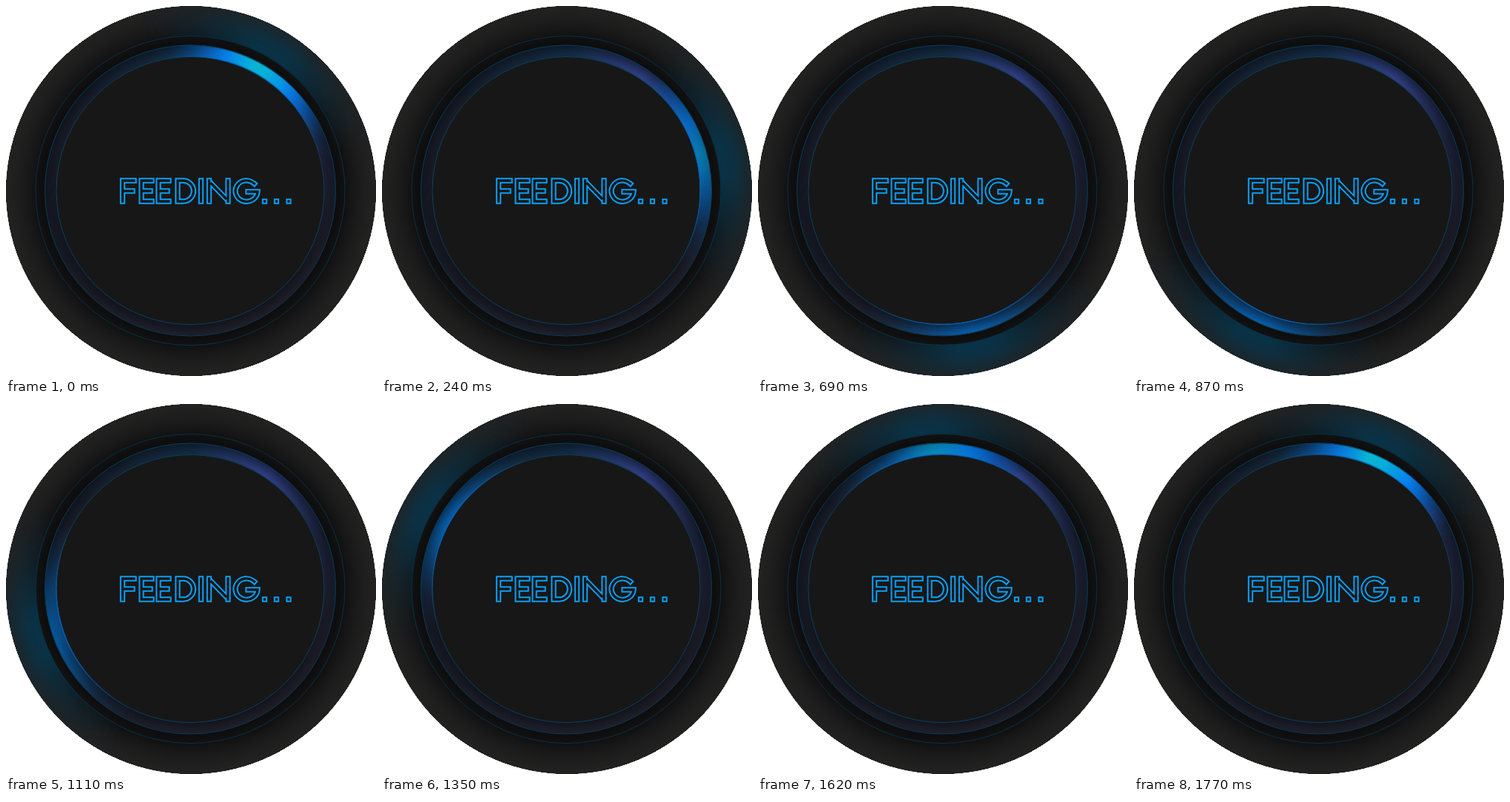
Recreate the animation shown at these times as an HTML page. Size 500x500 px, loop 1.8 s.

```html
<!DOCTYPE html>
<html lang="en">
<head>
<meta charset="utf-8">
<title>Feeding</title>
<style>
  html, body { margin: 0; width: 100%; height: 100%; overflow: hidden; background: #fff; }
  .dial { position: relative; width: 500px; height: 500px; overflow: hidden; }
  .dial div, .dial svg { position: absolute; inset: 0; }
  .dial .hub { inset: -1px 1px 1px -1px; }

  .disc {
    border-radius: 50%;
    overflow: hidden;
    background: radial-gradient(circle closest-side, #111 209px, #181818 221px, #1e1e1e 234px, #222221 250px);
  }

  .spin { animation: spin 1.8s steps(60) infinite; }
  @keyframes spin {
    from { transform: rotate(30deg); }
    to { transform: rotate(390deg); }
  }

  /* soft light on the outer plate */
  .halo {
    -webkit-mask: radial-gradient(circle closest-side, #000 212px, rgba(0,0,0,.85) 228px, rgba(0,0,0,.25) 250px);
    mask: radial-gradient(circle closest-side, #000 212px, rgba(0,0,0,.85) 228px, rgba(0,0,0,.25) 250px);
  }
  .halo .spin {
    background: conic-gradient(from -46deg, transparent, rgba(8,56,80,.3) 18deg, rgba(8,56,80,.85) 40deg,
      rgba(8,56,80,.85) 52deg, rgba(8,56,80,.3) 74deg, transparent 92deg);
  }

  .groove {
    background: radial-gradient(circle closest-side, #0d0d0e 198px, #111112 208px, transparent 209.5px);
  }

  /* the glowing channel */
  .ring {
    -webkit-mask: radial-gradient(circle closest-side, transparent 180px, #000 181px 196px, transparent 197px);
    mask: radial-gradient(circle closest-side, transparent 180px, #000 181px 196px, transparent 197px);
    background: conic-gradient(#12293f, #213463 18deg, #2f3d80 34deg, #262f5e 48deg, #1b2036 68deg,
      #1c1c27 110deg, #1e1d26 150deg, #1d1e2a 190deg, #181a24 240deg, #161b26 310deg, #12293f);
  }
  .beam {
    background: conic-gradient(from -46deg, transparent, rgba(8,86,156,.2) 14deg, rgba(8,86,156,.65) 28deg,
      rgba(8,90,164,.96) 42deg, rgba(8,90,164,.96) 50deg, rgba(8,86,156,.65) 64deg,
      rgba(8,86,156,.2) 78deg, transparent 92deg);
  }

  /* bevel: outer side dark above, inner side dark below */
  .above {
    background: radial-gradient(circle closest-side, transparent 184px, rgba(6,10,16,.5) 197px);
    -webkit-mask: linear-gradient(#000 30%, transparent 70%);
    mask: linear-gradient(#000 30%, transparent 70%);
  }
  .below {
    background: radial-gradient(circle closest-side, rgba(6,10,16,.5) 181px, transparent 194px);
    -webkit-mask: linear-gradient(transparent 40%, #000 80%);
    mask: linear-gradient(transparent 40%, #000 80%);
  }

  .boost {
    -webkit-mask: conic-gradient(from -25deg, transparent, rgba(0,0,0,.6) 25deg, #000 45deg 65deg, rgba(0,0,0,.5) 90deg, transparent 130deg);
    mask: conic-gradient(from -25deg, transparent, rgba(0,0,0,.6) 25deg, #000 45deg 65deg, rgba(0,0,0,.5) 90deg, transparent 130deg);
  }
  .boost .spin {
    background: conic-gradient(from -40deg, transparent, rgba(4,110,225,.45) 12deg, #0682f2 24deg,
      #08b4d4 37deg, #08b0d8 43deg, #0680ee 56deg, rgba(4,100,215,.5) 68deg, transparent 80deg);
  }

  .edge {
    -webkit-mask: radial-gradient(circle closest-side, transparent 180px, #000 180.6px 181.6px, transparent 182.4px);
    mask: radial-gradient(circle closest-side, transparent 180px, #000 180.6px 181.6px, transparent 182.4px);
  }
  .edge .spin {
    background: conic-gradient(from -45deg, transparent, rgba(10,104,196,.65) 36deg 54deg, transparent 90deg);
  }

  .lines { fill: none; }
  .word { fill: none; stroke-linecap: square; stroke-linejoin: miter; }
</style>
</head>
<body>
<div class="dial">
  <svg viewBox="0 0 500 500" shape-rendering="crispEdges">
    <circle cx="250" cy="250" r="250" fill="#0c2236"/>
  </svg>
  <div class="disc">
    <div class="halo"><div class="spin"></div></div>
  </div>
  <div class="hub">
    <div class="groove"></div>
    <div class="ring">
      <div class="beam spin"></div>
      <div class="above"></div>
      <div class="below"></div>
      <div class="boost"><div class="spin"></div></div>
    </div>
  </div>
  <svg viewBox="0 0 500 500" role="img" aria-label="FEEDING...">
    <defs>
      <path id="word" d="M173 236H157.5V264M157.5 250H171
        M197 236H183V264H197M183 250H195
        M220 236H206V264H220M206 250H218
        M232 236V264H239.5A14 14 0 0 0 239.5 236Z
        M263.5 236V264
        M274.5 264V236M277.5 240L297 260M300 264V236
        M335.6 240A15 14.2 0 1 0 340 251H327
        M349.5 264h.01M365.5 264h.01M382 264h.01"/>
    </defs>
    <g class="lines">
      <circle cx="249" cy="249.5" r="209" stroke="#083348"/>
      <circle cx="249" cy="249.5" r="196.5" stroke="#0a3d55"/>
      <circle cx="249" cy="249.5" r="181" fill="#171717" stroke="#0b4260"/>
    </g>
    <g class="word">
      <use href="#word" stroke="#0a9ff5" stroke-width="7.3"/>
      <use href="#word" stroke="#171717" stroke-width="3.3"/>
    </g>
  </svg>
  <div class="hub edge"><div class="spin"></div></div>
</div>
</body>
</html>
```
